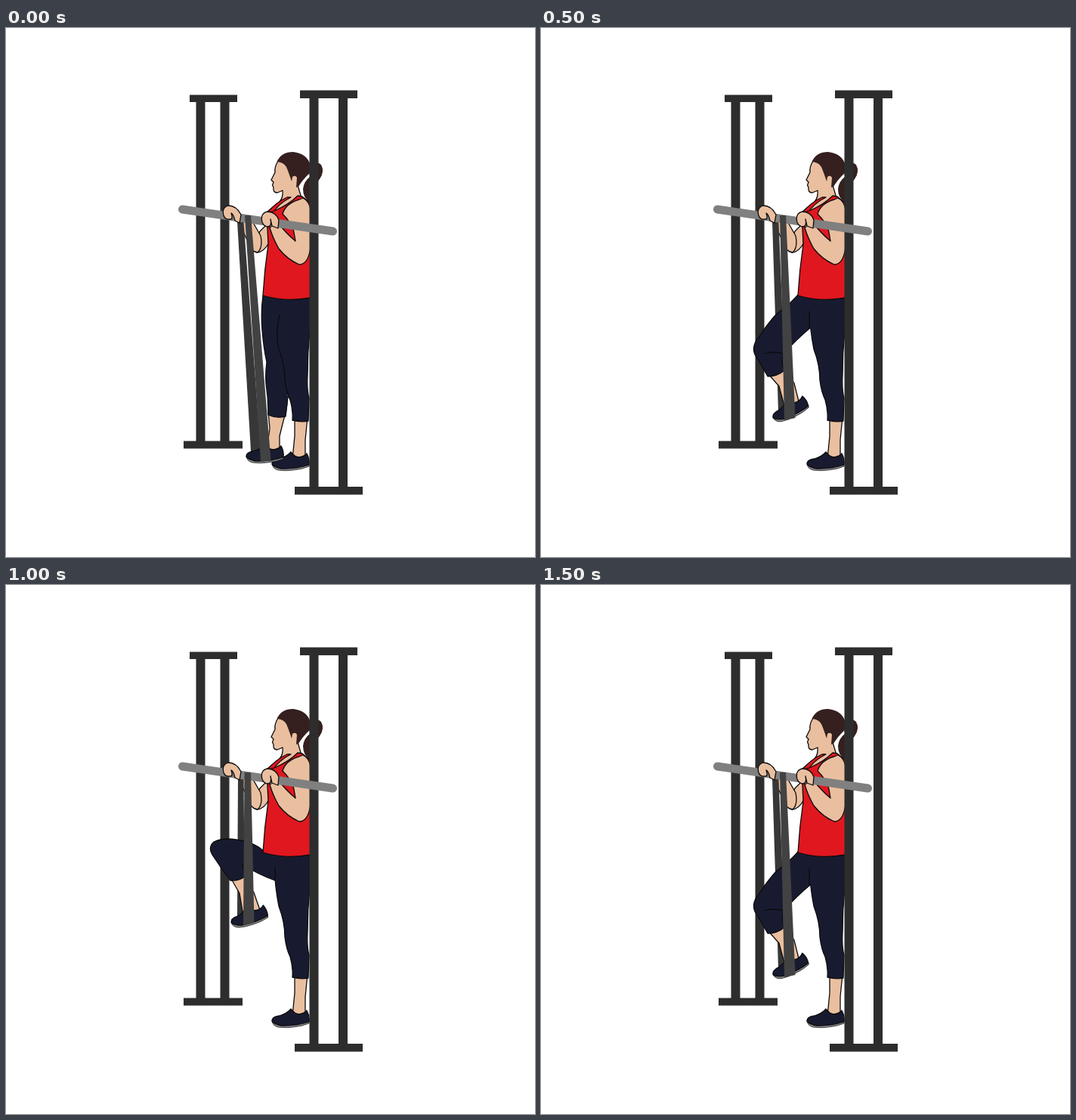
Animation, 700 px wide and 700 px high, one loop 2000 ms. Source, as an HTML page:

```html
<!DOCTYPE html>
<html lang="en">
<head>
<meta charset="utf-8">
<title>Banded knee raise</title>
<style>
  html, body { margin: 0; height: 100%; overflow: hidden; background: #fff; }
  svg { display: block; width: 100%; height: 100%; }
  .ink { stroke: #0b0b0d; stroke-width: 1.3; stroke-linejoin: round; stroke-linecap: round; }
  .skin { fill: #eabf9f; }
  .red { fill: #e0171f; }
  .pants { fill: #181b30; }
  .hair { fill: #35201f; }
  .rack { fill: #2d2d2d; }
  .line { fill: none; }
</style>
</head>
<body>
<svg viewBox="0 0 700 700">
  <defs>
    <g id="shoe" class="ink">
      <path fill="#8b8b8b" d="M0 0Q0 7 8 9Q18 10.500 28 9Q40 8 49 4V0Z" stroke-width=".7"/>
      <path class="pants" d="M0 1Q0-5 10-6Q20-9 25-15Q30-8 36-8Q43-9 46-13Q50-6 49 2Q30 8 12 7Q3 5 0 1Z"/>
    </g>
  </defs>

  <path class="rack" d="M243 88.500h63v9.500h-63zM251.500 98h12v449h-12zM283.500 98h12v449h-12zM235 546.500h78v10h-78z"/>

  <!-- far arm -->
  <g class="ink skin">
    <path d="M347 258L336 269L329 285L332 297Q341 297 348 284Z"/>
    <path d="M305 250L320 283Q325 297 333 297Q340 291 337 275L325 254Z"/>
  </g>

  <path id="backBand" fill="#373737"/>

  <!-- standing leg -->
  <path class="skin ink" d="M382 515L382 540L379 570H396L396 545L399 515Z"/>
  <use href="#shoe" x="352" y="576"/>
  <path class="pants ink" d="M346 352L355 372Q356 400 361 425Q369 446 369 466Q371 482 376 492Q380 506 379 519Q390 522 400 520L401 490Q398 478 399 460Q399 430 402 400V352Z"/>

  <!-- moving leg -->
  <path id="shin" class="skin ink"/>
  <use id="foot" href="#shoe"/>
  <path id="thigh" class="pants"/>
  <path id="thighInk" class="ink line"/>

  <!-- head and torso -->
  <path class="hair" d="M400 179Q411 175 417 181Q422 190 415 200Q407 208 404 219L403 231Q393 226 393 213Q394 203 402 197Z"/>
  <path class="skin ink" stroke-width=".9" d="M360 176Q355 184 356 191L351 201L354 204L352.500 208L354 211Q353 218 359 218L366 215Q367 224 362 230L346 243L360 248L402 232L391 225L386 208L387 175Z"/>
  <path class="hair" d="M358.500 177Q364 164 380 164Q397 166 402 179V192Q393 200 387 210L384 211L385 198Q383 194 379 197L378 203Q374 191 371 184Q368 178 358.500 177Z"/>
  <path class="red ink" d="M372 224Q358 230 345 245L353 245Q361 232 377 224Z"/>
  <path class="red ink" d="M386 222Q374 234 355 242L345 245L347 286Q342 320 340 354Q370 363 403 357V232L392 223Z"/>
  <path class="skin ink" d="M366 246Q370 232 388 227L393 225Q401 229 403 240V290Q400 313 388 313Q372 306 361 292Q353 278 349 264L360 258Q371 272 383 282L381 270Q378 258 366 246Z"/>

  <path class="rack" d="M389 82.500h76v10.500h-76zM401.500 93h12v514h-12zM440 93h12v514h-12zM382 607h90v10.500h-90z"/>
  <path d="M233.500 240L432.500 269" stroke="#808080" stroke-width="11" stroke-linecap="round"/>

  <!-- hands -->
  <g class="skin ink">
    <path d="M288 248Q285 238 294 235Q305 235 311 247L309 258L303 255Q301 246 298 245Q301 254 296 253Q290 254 288 248Z"/>
    <path d="M339 257Q336 245 346 243Q357 243 361 254L360 265L352 262L350 253Q352 263 346 263Q341 262 339 257Z"/>
  </g>
  <path id="frontBand" fill="#424242"/>
</svg>

<script>
const poses = [
  {
    backBand: "M306 256L314.500 257L338 572L324 560Z",
    frontBand: "M316 248L324 248L350.500 572L337 574Z",
    shin: "M347 508L349 530L345 558H362L362 540L370 508Z",
    foot: "translate(318 566)",
    thigh: "M340 354Q337 375 339 400Q341 425 345 442Q343 458 344 470Q347 490 347 512Q358 517 370 514Q373 500 373 488Q369 462 369 445L364 425L402 400V358Q370 363 340 354Z",
    thighInk: "M340 354Q337 375 339 400Q341 425 345 442Q343 458 344 470Q347 490 347 512Q358 517 370 514L373 488M362 380Q356 405 361 425Q369 446 369 466Q371 482 376 492"
  },
  {
    backBand: "M306 256L314.500 257L325 510L314 507Z",
    frontBand: "M316 248L324 248L336.500 516L322 519Z",
    shin: "M300 457L315 474L322 500L341 494L335 470L321 446Z",
    foot: "translate(307 515) rotate(-20)",
    thigh: "M341 352Q328 367 312 378Q300 391 289 408Q278 421 283 432Q291 445 300 461Q313 461 322 453L319 444L321 431Q339 411 356 397L375 380V359Z",
    thighInk: "M341 352Q328 367 312 378Q300 391 289 408Q278 421 283 432Q291 445 300 461Q313 461 322 453L319 444L321 431Q339 411 356 397M296 431Q308 427 321 431M355 397V375"
  },
  {
    backBand: "M307 256L314.500 257L316 441L306 438Z",
    frontBand: "M315.500 248L324 248L328.500 447L314 450Z",
    shin: "M297 387L309 408L313 432L336 430L328 407L314 382Z",
    foot: "translate(298 446) rotate(-12)",
    thigh: "M341 352Q326 339 305 337Q287 334 275 340Q267 347 273 357Q284 374 297 391Q307 392 316 386L313 370Q334 383 356 391L375 380V359Z",
    thighInk: "M341 352Q326 339 305 337Q287 334 275 340Q267 347 273 357Q284 374 297 391Q307 392 316 386L313 370Q334 383 356 391V374"
  }
];
const order = [0, 1, 2, 1];
const stepMs = 500;
let shown = -1;

function showPose(index) {
  for (const [id, value] of Object.entries(poses[index])) {
    document.getElementById(id).setAttribute(id === "foot" ? "transform" : "d", value);
  }
  shown = index;
}

function tick() {
  const index = order[Math.floor(performance.now() / stepMs) % order.length];
  if (index !== shown) showPose(index);
  requestAnimationFrame(tick);
}
tick();
</script>
</body>
</html>
```
